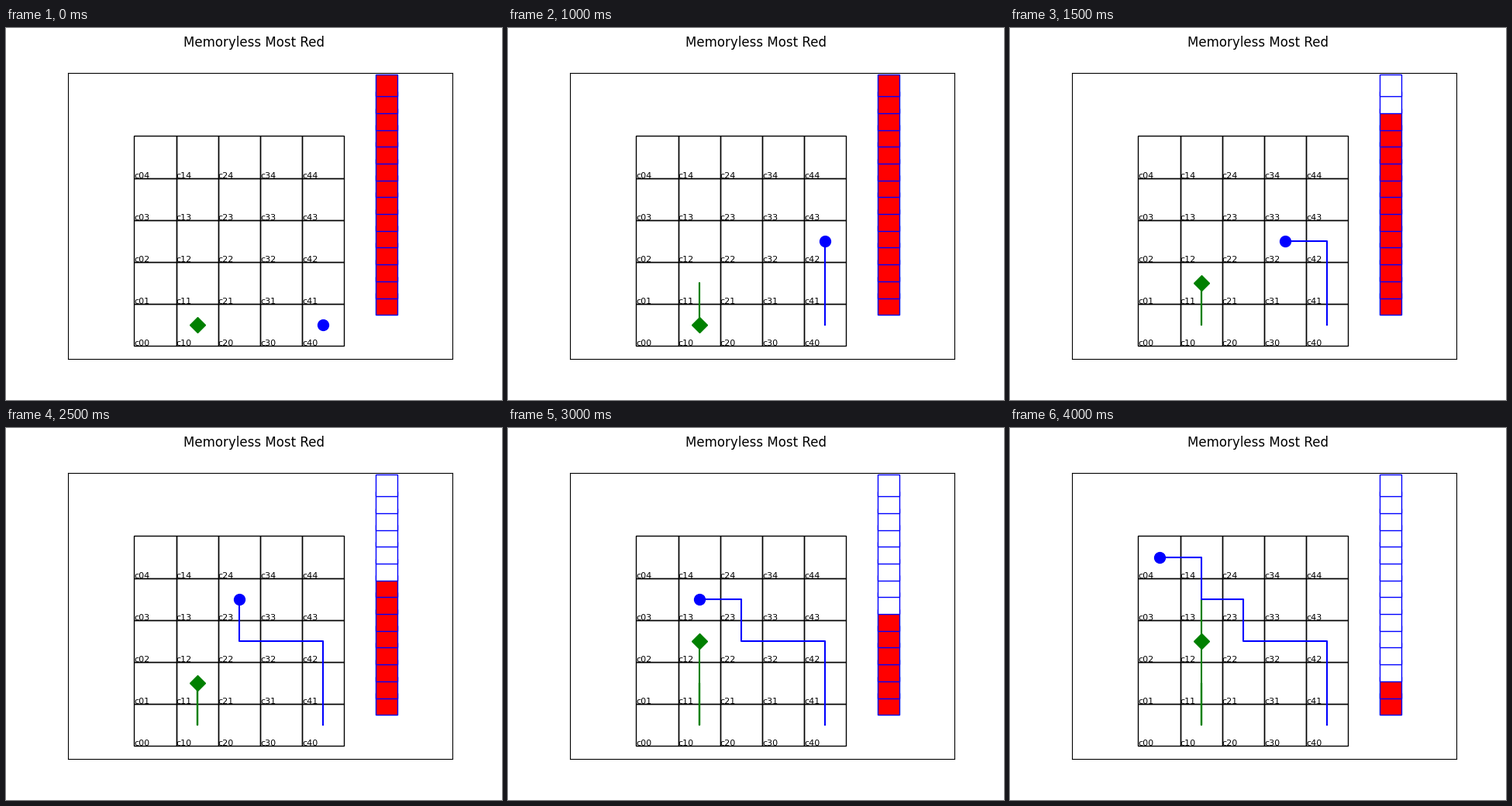
Animation of 640x480 px, one loop 4.5 s. Source, as a matplotlib script:

```python
import matplotlib.pyplot as plt
from matplotlib.animation import FuncAnimation
from matplotlib.patches import Rectangle

SIZE = 5
LEVELS = 14
STEP_MS = 500

# Cells visited by each agent and the red level, one entry per step
BLUE = [(4, 0), (4, 1), (4, 2), (3, 2), (2, 2), (2, 3), (1, 3), (1, 4), (0, 4)]
GREEN = [(1, y) for y in (0, 1, 0, 1, 0, 1, 2, 3, 2)]
RED = [14, 12, 14, 12, 10, 8, 6, 4, 2]

plt.rcParams["font.family"] = "DejaVu Sans"
fig = plt.figure(figsize=(6.4, 4.8), dpi=100, facecolor="white")
ax = fig.add_axes([0.125, 0.11, 0.775, 0.77])
ax.set_xticks([])
ax.set_yticks([])
fig.suptitle("Memoryless Most Red", fontsize=12)

# Equal scale on both axes, centred on x = 3
y_low, y_high = -0.31, 6.51
half_width = (y_high - y_low) * 496 / 369.6 / 2
ax.set_xlim(3 - half_width, 3 + half_width)
ax.set_ylim(y_low, y_high)

for i in range(SIZE):
    for j in range(SIZE):
        ax.add_patch(Rectangle((i, j), 1, 1, fill=False, ec="black", lw=1))
        ax.text(i, j, f"c{i}{j}", fontsize=8)

gauge = [
    ax.plot([6], [1 + 0.4 * k], "s", ms=20, mfc="red", mec="blue", mew=1)[0]
    for k in range(LEVELS)
]


def make_agent(color, marker):
    trail, = ax.plot([], [], color=color, lw=1.5)
    head, = ax.plot([], [], marker, color=color, ms=10)
    return trail, head


def move_agent(agent, cells):
    trail, head = agent
    xs = [x + 0.5 for x, _ in cells]
    ys = [y + 0.5 for _, y in cells]
    trail.set_data(xs, ys)
    head.set_data(xs[-1:], ys[-1:])


green = make_agent("green", "D")
blue = make_agent("blue", "o")


def update(step):
    move_agent(green, GREEN[:step + 1])
    move_agent(blue, BLUE[:step + 1])
    for k, square in enumerate(gauge):
        square.set_markerfacecolor("red" if k < RED[step] else "white")
    return [*gauge, *green, *blue]


anim = FuncAnimation(fig, update, frames=len(RED), interval=STEP_MS,
                     init_func=lambda: update(0), repeat=True,
                     repeat_delay=0, blit=False)
plt.show()
```
